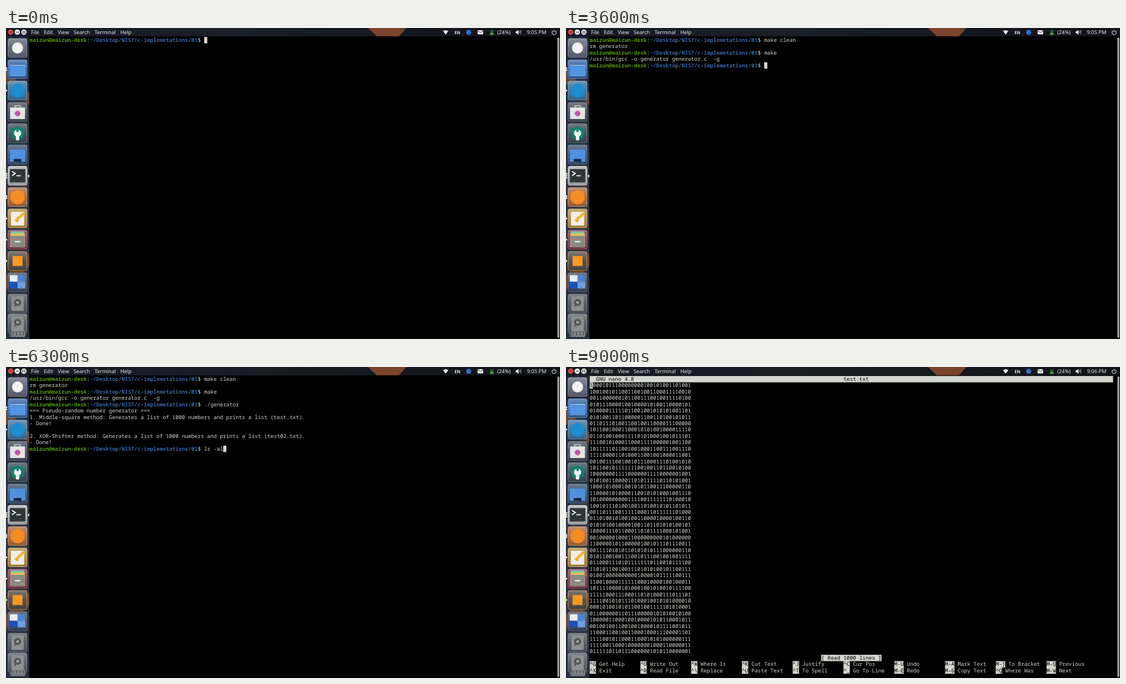
An HTML page that plays this animation: 998x561 px, repeating every 9900 ms.

```html
<!DOCTYPE html>
<html lang="en">
<head>
<meta charset="utf-8">
<title>Terminal session</title>
<style>
html, body { margin: 0; width: 100%; height: 100%; overflow: hidden; background: #000; }
svg { display: block; }
text { white-space: pre; text-rendering: geometricPrecision; }
#term { font: 9.525px "Noto Sans Mono", "DejaVu Sans Mono", monospace; fill: #d3d7cf; }
#term .user { fill: #4e9a06; font-weight: 700; }
#term .path { fill: #3465a4; font-weight: 700; }
#term .inv { fill: #000; }
#bar text { font: 9.3px "Noto Sans", "Open Sans", sans-serif; fill: #eee; }
#bar .menu { word-spacing: 5.9px; }
#bar .lang { font-size: 7.6px; font-weight: 700; }
</style>
</head>
<body>
<svg width="998" height="561" viewBox="0 0 998 561">
  <defs>
    <linearGradient id="panel">
      <stop offset="0" stop-color="#171b25"/>
      <stop offset=".4" stop-color="#1b1e27"/>
      <stop offset="1" stop-color="#11131a"/>
    </linearGradient>
    <linearGradient id="side" x2="0" y2="1">
      <stop offset="0" stop-color="#1b2230"/>
      <stop offset=".5" stop-color="#303746"/>
      <stop offset="1" stop-color="#262d3b"/>
    </linearGradient>
    <linearGradient id="gloss" x2="0" y2="1">
      <stop offset="0" stop-color="#fff" stop-opacity=".28"/>
      <stop offset=".5" stop-color="#fff" stop-opacity=".06"/>
      <stop offset="1" stop-color="#000" stop-opacity=".12"/>
    </linearGradient>
  </defs>
  <rect width="998" height="561"/>

  <g id="bar">
    <rect width="998" height="15" fill="url(#panel)"/>
    <path d="M652 0H721L708 15H668Z" fill="#7b432c"/>
    <text class="menu" x="45" y="11">File Edit View Search Terminal Help</text>
    <circle cx="8.5" cy="7.5" r="4.8" fill="#dc4a41"/>
    <path d="M6.7 5.7l3.6 3.6m0-3.6l-3.6 3.6" stroke="#501c18"/>
    <circle cx="20.3" cy="7.5" r="4.8" fill="#f2f2f2"/>
    <path d="M17.8 7.5h5" stroke="#333" stroke-width="1.3"/>
    <circle cx="32.3" cy="7.5" r="4.8" fill="#f2f2f2"/>
    <rect x="30.2" y="5.8" width="4.2" height="3.4" fill="none" stroke="#333"/>
    <path d="M787.3 5.6Q792 2.6 796.7 5.6L792 12Z" fill="#eee"/>
    <text class="lang" x="808" y="10.6">EN</text>
    <circle cx="833.5" cy="7.7" r="4.6" fill="#2f6fc4"/>
    <rect x="849.5" y="4" width="10" height="7.6" rx="1" fill="#eee"/>
    <path d="M850 5l4.5 3.4L859 5" fill="none" stroke="#22252e"/>
    <rect x="872.4" y="4" width="5.8" height="8.4" fill="#1d5c2a"/>
    <rect x="872.4" y="9" width="5.8" height="3.4" fill="#49a84c"/>
    <path d="M918 6h2.3l3-2.8v9l-3-2.8H918z" fill="#eee"/>
    <path d="M925 5.5q1.4 2.2 0 4.4M926.8 4q2.6 3.7 0 7.4" fill="none" stroke="#ccc" stroke-width=".9"/>
    <path d="M985.3 5a3.7 3.7 0 1 0 4.2 0M987.4 3.2v4.3" fill="none" stroke="#eee" stroke-width="1.1"/>
    <text x="885" y="11">(24%)</text>
    <text id="clock" x="938.5" y="11"></text>
  </g>

  <g id="dock">
    <rect y="15" width="42" height="546" fill="url(#side)"/>
    <path d="M0 76L42 118v20L0 101ZM42 406v23L0 472v-26Z" fill="#6b4430"/>
  </g>
  <rect x="993.4" y="17" width="3.4" height="542" rx="1.7" fill="#a9aaa8"/>
  <g id="term"></g>
</svg>

<script>
const NS = 'http://www.w3.org/2000/svg';
const byId = id => document.getElementById(id);
const term = byId('term'), dock = byId('dock'), clock = byId('clock');

function add(parent, tag, attrs, text) {
  const el = document.createElementNS(NS, tag);
  for (const k in attrs) el.setAttribute(k, attrs[k]);
  if (text !== undefined) el.textContent = text;
  parent.appendChild(el);
  return el;
}

// Icon parts, centred on the tile: wide boxes by top and bottom edge, discs and lines
const box = (half, top, bottom, fill) =>
  `<rect x="${-half}" y="${top}" width="${half * 2}" height="${bottom - top}" rx="1" fill="${fill}"/>`;
const disc = (r, fill, y = 0) => `<circle cy="${y}" r="${r}" fill="${fill}"/>`;
const line = (d, stroke, w = 2) => `<path d="${d}" fill="none" stroke="${stroke}" stroke-width="${w}"/>`;

const disk = box(11, -13, 13, '#8e9092') + disc(6.5, '#55585c', -2) +
  line('M-6 6l5-5', '#55585c') + disc(2.4, '#a4a6a8', -2);

const tiles = [
  { fill: '#5b6176', edge: '#858a9b', icon: disc(10, '#f2f2f2') },
  { fill: '#305f9e', edge: '#6a91c4', open: 2,
    icon: box(14, -10, -6, '#3567a8') + box(14, -8, 12, '#e4e4e4') + box(14, -7, 12, '#5294e2') },
  { fill: '#397097', edge: '#6c9dbd', open: 1, icon: disc(12.5, '#1b8bd2') },
  { fill: '#3e4452', edge: '#707684',
    icon: line('M-5-6v-5h10v5', '#bcc0c4') + box(13.5, -8, 13, '#e4e4e4') + disc(5, '#c552a6', 3) },
  { fill: '#384953', edge: '#6d7b83',
    icon: disc(11, '#128071') + line('M0-12V12M-12 0H12M-9-9L9 9M9-9L-9 9', '#128071', 5) +
      disc(6.5, '#f0f0f0') + box(3, 0, 13, '#f0f0f0') + box(2, -8, -2, '#128071') },
  { fill: '#334a6b', edge: '#647997', icon: box(14, -9, 13, '#4f91df') + box(7, 8, 13, '#18293f') },
  { fill: '#a9adac', edge: '#d0d3d1', open: 3,
    icon: box(14, -12, 12, '#303536') + line('M-10-8l6 4l-6 4M-2 0h8', '#eee') },
  { fill: '#a4653b', edge: '#cf9c76', open: 2, icon: disc(13, '#f68a23') },
  { fill: '#ad873b', edge: '#d2b473', open: 1,
    icon: box(12, -12, 13, '#f0eee7') + line('M-4 5L12-10', '#f5b52b', 5) + disc(1, '#444', 5) },
  { fill: '#822e40', edge: '#b25d6e', open: 1,
    icon: ['#72bed0', '#9bcf64', '#edc454'].map((c, i) => box(12 + i / 2, -15 + i * 2.5, 0, c)).join('') +
      box(14, -7, 14, '#8d8a86') + line('M-5 3.5h10', '#f1f1f1', 2.4) },
  { fill: '#484744', edge: '#d18b43', open: 1, icon: '<rect x="-9" y="-9" width="18" height="18" fill="#fa9a20"/>' },
  { fill: '#3a4354', edge: '#626c7d',
    icon: ['#e9edf3', '#4d83ce', '#1a50b8', '#6d9ddd'].map((c, i) =>
      `<rect x="${i % 2 * 14 - 14}" y="${i < 2 ? -13 : -1}" width="14" height="12" fill="${c}"/>`).join('') },
  { fill: '#4c535f', edge: '#6c727d', icon: disk },
  { fill: '#535a65', edge: '#70767f', icon: disk }
];

const PITCH = 38.43;
tiles.forEach(({ fill, edge, icon, open = 0 }, i) => {
  const y = Math.min(36 + i * PITCH, 533);
  const g = add(dock, 'g', { transform: `translate(20.8 ${y})` });
  const frame = { x: -17, y: -17, width: 34, height: 34, rx: 3 };
  add(g, 'rect', { ...frame, fill, stroke: edge });
  add(g, 'rect', { ...frame, fill: 'url(#gloss)' });
  g.insertAdjacentHTML('beforeend', icon);
  for (let n = 0; n < open; n++) {
    const my = y + (n - (open - 1) / 2) * 3.6;
    add(dock, 'path', { d: `M0 ${my - 2.2}l3 2.2l-3 2.2z`, fill: '#e0e2e5' });
  }
});
add(dock, 'path', { d: 'M42 264l-3.5 3l3.5 3z', fill: '#e0e2e5' });
add(dock, 'path', { d: 'M5 550h32l-3 8h-26z', fill: '#5a606a' });
for (let x = 11; x < 32; x += 6)
  add(dock, 'rect', { x, y: 546, width: 4, height: 10, rx: 2, fill: 'none', stroke: '#96999c', 'stroke-width': 1.3 });

// Character grid
const X0 = 42.6, Y0 = 16.2, CW = 5.715, LH = 11.43, COLS = 165;
const put = (col, row, text, cls = '') =>
  add(term, 'text', { x: X0 + col * CW, y: Y0 + row * LH + 8.8, class: cls }, text);
const block = (col, row, n = 1) =>
  add(term, 'rect', { x: X0 + col * CW, y: Y0 + row * LH, width: n * CW, height: LH, fill: '#d3d7cf' });
function inverse(col, row, text, width = text.length) {
  block(col, row, width);
  put(col, row, text, 'inv');
}

const USER = 'maizun', LOGIN = `${USER}@${USER}-desk`;
const CWD = '~/Desktop/NIST/c-implemetations/01';
const PROMPT = `${LOGIN}:${CWD}$ `.length;

function prompt(row, cmd) {
  const n = LOGIN.length;
  put(0, row, LOGIN, 'user');
  put(n, row, ':');
  put(n + 1, row, CWD, 'path');
  put(n + 1 + CWD.length, row, '$ ' + cmd);
}

const entry = (mode, links, size, date, name, cls) =>
  ({ text: `${mode} ${links} ${USER} ${USER} ${String(size).padStart(5)} Mar ${date} `, name, cls });
const report = (title, file) =>
  [`${title} method: Generates a list of 1000 numbers and prints a list (${file}).`, '- Done!'];

const session = [
  ['make clean', ['rm generator']],
  ['make', ['/usr/bin/gcc -o generator generator.c  -g']],
  ['./generator ', [
    '=== Pseudo-random number generator ===',
    ...report('1. Middle-square', 'test.txt'), '',
    ...report('2. XOR-Shifter', 'test02.txt')]],
  ['ls -al', [
    'total 116',
    entry('drwxrwxr-x', 3, 4096, '18 21:05', '.', 'path'),
    entry('drwxrwxr-x', 3, 4096, '17 15:00', '..', 'path'),
    entry('-rwxrwxr-x', 1, 20496, '18 21:05', 'generator', 'user'),
    entry('-rw-rw-r--', 1, 2186, '18 20:03', 'generator.c'),
    entry('-rw-rw-r--', 1, 278, '17 14:52', 'Makefile'),
    entry('-rw-rw-r--', 1, 33000, '18 21:05', 'test02.txt'),
    entry('-rw-rw-r--', 1, 33000, '18 21:05', 'test.txt'),
    entry('drwxrwxr-x', 2, 4096, '17 15:07', '.vscode', 'path')]],
  ['nano test.txt', []]
];

// Seeded 32-bit words, slightly more zeros than ones
function randomWords(count, seed) {
  const bit = () => {
    seed = (Math.imul(seed, 1664525) + 1013904223) >>> 0;
    return seed / 2 ** 32 < 0.44 ? '1' : '0';
  };
  return Array.from({ length: count }, () => Array.from({ length: 32 }, bit).join(''));
}
const words = randomWords(43, 7);

const keys = [
  ['^G Get Help', '^O Write Out', '^W Where Is', '^K Cut Text', '^J Justify', '^C Cur Pos',
    'M-U Undo', 'M-A Mark Text', 'M-] To Bracket', 'M-Q Previous'],
  ['^X Exit', '^R Read File', '^\\ Replace', '^U Paste Text', '^T To Spell', '^_ Go To Line',
    'M-E Redo', 'M-6 Copy Text', '^Q Where Was', 'M-W Next']
];

function drawShell(step) {
  let row = 0;
  const now = step >> 1;
  for (const [cmd, out] of session.slice(0, now)) {
    prompt(row++, cmd);
    for (const line of out) {
      const { text = line, name = '', cls } = line;
      if (step === 8 && name.startsWith('test')) inverse(0, row, text + name, COLS);
      else {
        put(0, row, text);
        put(text.length, row, name, cls);
      }
      row++;
    }
  }
  const typed = step % 2 ? session[now][0] : '';
  prompt(row, typed);
  block(PROMPT + typed.length, row);
}

function drawEditor() {
  inverse(0, 0, '  GNU nano 4.8', COLS);
  put(80, 0, 'test.txt', 'inv');
  words.forEach((word, i) => put(0, i + 1, word));
  inverse(0, 1, words[0][0]);
  inverse(73, 44, '[ Read 1000 lines ]');
  keys.forEach((list, r) => list.forEach((item, i) => {
    const [key] = item.split(' ');
    inverse(i * 16, 45 + r, key);
    put(i * 16 + key.length, 45 + r, item.slice(key.length));
  }));
}

// Each step is held for HOLD ms: even steps show output, odd steps a typed command
const HOLD = 900, STEPS = 11;
let shown = -1;
function frame() {
  const step = Math.floor(performance.now() / HOLD) % STEPS;
  if (step !== shown) {
    shown = step;
    const editing = step === STEPS - 1;
    term.replaceChildren();
    clock.textContent = editing ? '9:06 PM' : '9:05 PM';
    if (editing) drawEditor();
    else drawShell(step);
  }
  requestAnimationFrame(frame);
}
frame();
</script>
</body>
</html>
```
